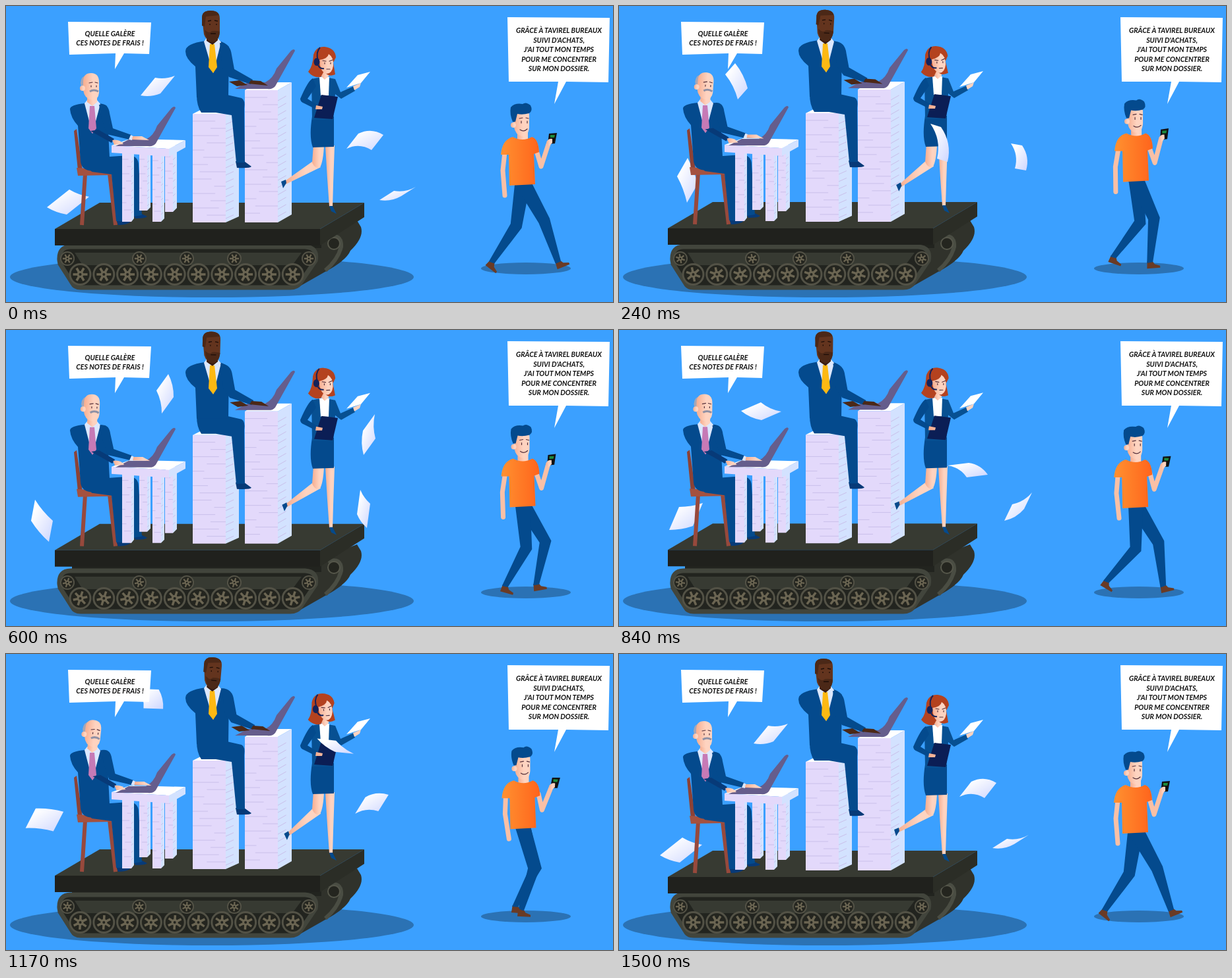
An HTML page for the animation above (1.53 s loop, 920 by 450 pixels).

```html
<!DOCTYPE html>
<html lang="fr">
<head>
<meta charset="utf-8">
<style>
html, body { margin: 0; width: 100%; height: 100%; overflow: hidden; background: #3ba0ff }
svg { display: block; width: 920px; height: 450px }
text { font: italic 700 10.6px Lato, sans-serif; text-anchor: middle; fill: #111 }
.navy { fill: #044a8d }
.dark { fill: #073a78 }
.skin { fill: url(#skin) }
.brown { fill: #4b2817 }
.page { fill: #e3d9fb }
.edge { fill: #d3e2ff }
.white { fill: #fff }
.shirt { fill: #dce8ff }
.laptop { fill: #655d8c }
.line { fill: none; stroke: #c9bfea }
.face { fill: none; stroke: #54303a; stroke-width: 1.2; stroke-linecap: round }
.limb { fill: none; stroke: #f9c0a6; stroke-width: 7; stroke-linecap: round; stroke-linejoin: round }
.chair { fill: none; stroke: #97493c; stroke-width: 6 }
.sheet { fill: url(#sheet) }
</style>
</head>
<body>
<svg viewBox="0 0 920 450">
<defs>
  <linearGradient id="skin"><stop stop-color="#f6ad8f"/><stop offset=".6" stop-color="#fed3c0"/></linearGradient>
  <linearGradient id="shirt"><stop stop-color="#ff9130"/><stop offset="1" stop-color="#ff641c"/></linearGradient>
  <linearGradient id="sheet" x2="1" y2="1"><stop offset=".2" stop-color="#fff"/><stop offset="1" stop-color="#cdd6ff"/></linearGradient>
  <path id="laptop" class="laptop" d="M166 213 186 203H212Q224 197 229 182L251 155Q256 151 257 155L227 209Q223 214 215 213Z"/>
</defs>
<g fill="#2b72b4"><ellipse cx="312" cy="412" rx="306" ry="31"/><ellipse cx="788" cy="399" rx="68" ry="9"/></g>

<!-- tracks -->
<path fill="#30322b" d="M440 429 482 405Q516 387 522 372 543 352 538 336L532 326 470 350Z"/>
<path fill="none" stroke="#4a4d43" stroke-width="6" d="M488 352Q509 345 508 366 503 386 484 402"/>
<circle cx="497" cy="361" r="9" fill="#24251f" stroke="#56574b" stroke-width="2"/>
<path fill="#22241f" d="M100 354H478V368H100Z"/>
<path fill="#22241f" stroke="#42453c" stroke-width="7" d="M81 386Q80 366 98 366H453Q473 367 469 387L446 421Q441 428 431 428H113Q104 428 101 422L82 392Z"/>
<path fill="#373a32" d="M104 375H448L434 394H116Z"/>
<g id="wheels"></g>

<g class="deck">
  <path fill="#373a32" d="M74 339 142 299H543L476 339Z"/>
  <path fill="#20211d" d="M74 339H476V364H74Z"/>
  <path fill="#2b2d26" d="M476 339 543 299V321L476 364Z"/>
</g>
<path class="sheet"/>

<g class="deck">
  <!-- seated clerk -->
  <path fill="#8c4236" d="M103 190 107 187 116 250H109Z"/>
  <path class="chair" d="M120 255 115 333M157 255 166 333"/>
  <path fill="#a4513f" d="M107 246 160 249V257L109 258Z"/>
  <path class="dark" d="M192 316H206L214 320Q212 323 196 323ZM167 325H189Q190 332 170 333Z"/>
  <path class="navy" d="M116 232 186 227Q201 228 201 242L206 318 194 320 188 327H167L160 256 130 252Z"/>
  <path class="navy" d="M120 148Q97 150 97 157 98 170 109 182L113 236Q114 250 132 251L158 250 153 152Q148 148 138 148Z"/>
  <path class="shirt" d="M119 148 123 143H138L143 149 131 194Z"/>
  <path fill="#c67ab6" d="M127 152H134L137 186 131 194 125 186Z"/>
  <g class="tilt" data-pivot="128 148" data-angle="6">
    <path class="skin" d="M123 132H138V146L131 152 123 146Z"/>
    <path fill="#a5a6b7" d="M113 117Q114 106 122 106V126H115Z"/>
    <path class="skin" d="M117 115Q117 102 129 102 141 102 141 116V132Q140 143 130 143 119 141 117 128Z"/>
    <circle class="skin" cx="116" cy="125" r="4"/>
    <path class="face" d="M129 121V123M137 121V123M126 117 131 116M135 116 139 117"/>
    <path d="M127 130Q133 126 140 130" fill="none" stroke="#8f91a5" stroke-width="3"/>
  </g>
  <g id="desk"></g>
  <path class="white" d="M160 212 188 202 272 204 247 217Z"/>
  <path class="page" d="M160 212 247 217V229L160 223Z"/>
  <path class="edge" d="M247 217 272 204V215L247 229Z"/>
  <use href="#laptop"/>
  <g class="typing">
    <path class="dark" d="M128 190 140 188 164 202 160 208Z"/>
    <path class="skin" d="M161 204Q172 202 178 210L164 211Z"/>
    <path class="navy" d="M141 150Q155 147 157 163L162 186 190 196 187 203 153 195 145 172Z"/>
    <path class="shirt" d="M189 196 193 198 191 204 186 203Z"/>
    <path class="skin" d="M192 198H206L217 204 191 203Z"/>
  </g>

  <g id="stacks"></g>

  <!-- man on the stack -->
  <path class="dark" d="M348 236H361L372 244Q370 247 350 246Z"/>
  <path class="navy" d="M289 135H335L357 140Q363 143 361 156L362 238H349L342 166 318 162H296Q289 152 289 135Z"/>
  <path class="navy" d="M302 53Q272 57 272 69 272 80 287 92L289 139H337L338 62Q332 55 322 53Z"/>
  <path class="shirt" d="M300 54 304 49H321L326 55 314 102Z"/>
  <path fill="#fdb913" d="M309 58H316L320 93 314 102 307 93Z"/>
  <use href="#laptop" x="181" y="-87"/>
  <g class="typing">
    <path class="brown" d="M338 115 354 113 366 120 350 122Z"/>
    <path class="navy" d="M324 56Q340 57 342 74L346 96 374 112 371 119 338 108 328 94Z"/>
    <path class="brown" d="M371 113 386 114 397 121 368 118Z"/>
  </g>
  <g class="tilt" data-pivot="312 55" data-angle="5">
    <path fill="#3a1d11" d="M304 38H321V52L313 59 304 53Z"/>
    <path fill="#63341e" d="M297 18Q297 7 310 7 324 7 324 19V39Q323 53 313 54 303 53 300 43Z"/>
    <path class="brown" d="M297 18Q297 7 310 7 321 7 323 14L303 16 301 31 297 30ZM301 36Q308 43 312 38 319 37 324 39 323 54 313 55 303 54 301 36Z"/>
    <path d="M309 27V29M319 27V29M306 23 311 22M316 22 321 23M310 42H318" fill="none" stroke="#1d0d08" stroke-width="1.3"/>
  </g>

  <!-- assistant -->
  <g id="calf">
    <path class="skin" d="M465 236 477 245 424 271 420 268Z"/>
    <path class="navy" d="M424 264 425 269 420 277 417 267Z"/>
  </g>
  <path class="skin" d="M466 211H482Q481 236 476 245 469 249 464 238Z"/>
  <path class="skin" d="M484 212H498L496 270 495 305H490L487 262Z"/>
  <path class="navy" d="M490 304H495L501 316 493 312ZM464 168H497V214L465 215Q459 199 464 168Z"/>
  <path fill="#075092" d="M463 111Q480 106 499 111L507 131 527 122 529 129 508 141 499 134 496 173H464Z"/>
  <path class="white" d="M475 108H490L489 136H477Z"/>
  <path class="skin" d="M478 100H489V107L483 112 478 107Z"/>
  <path fill="#0b1e55" d="M478 135 503 138 495 172 467 170Z"/>
  <path class="navy" d="M465 110Q458 113 446 141 446 146 452 148L470 157 473 151 457 141 470 122Z"/>
  <path class="skin" d="M470 151 480 153 479 157 469 157ZM526 122 538 117 536 123 528 128Z"/>
  <path class="white" d="M516 124 533 105 552 100 538 117Z"/>
  <g class="tilt" data-pivot="482 105" data-angle="-5">
    <path fill="#b4421f" d="M466 74Q470 61 483 62 499 64 500 78L496 86 499 104Q488 109 482 99L477 108Q466 110 458 100 465 92 466 74Z"/>
    <path class="skin" d="M475 82Q488 80 489 73 497 78 496 91 494 103 486 103 476 101 475 82Z"/>
    <path class="face" d="M483 86V88M492 86V88M480 83 485 84M490 84 495 82M486 96H491"/>
    <path d="M473 84Q469 70 476 63M473 90Q476 96 482 95" fill="none" stroke="#14225a" stroke-width="2"/>
    <ellipse cx="471" cy="85" rx="4.5" ry="6" fill="#14225a"/>
  </g>
</g>
<path class="sheet"/><path class="sheet"/><path class="sheet"/>

<!-- walker -->
<g id="legs"></g>
<g id="walker">
  <path class="limb" id="arm"/>
  <g id="phone">
    <path class="limb" d="M804 220 811 244 822 210"/>
    <path fill="#111" d="M823 194 835 193 832 209 821 210Z"/>
    <path fill="#1d8a3c" d="M825 196H832L831 200H825Z"/>
    <path class="skin" d="M819 207Q822 201 828 202V208L822 214Z"/>
  </g>
  <path class="skin" d="M775 186H791V202L783 207 775 202Z"/>
  <path fill="url(#shirt)" d="M768 199Q783 207 797 199 807 202 808 222L800 225 802 271 763 273 762 226 750 226Q752 203 768 199Z"/>
  <path class="skin" d="M769 165Q769 158 781 158 793 158 793 166V184Q792 198 782 198 772 196 770 184Z"/>
  <circle class="skin" cx="769" cy="181" r="4"/>
  <path class="navy" d="M768 176Q763 164 765 154 771 147 783 149 788 145 795 151 799 159 793 163 783 166 775 164L772 176Z"/>
  <path class="face" d="M781 175V178M790 175V178M778 171 783 170M788 170 792 171M779 188Q785 192 790 187"/>
</g>

<path class="white" d="M94 24 220 25 217 73 179 72 165 96 166 72 96 74Z"/>
<path class="white" d="M760 17 915 18 913 116 849 115 831 149 837 115 762 115Z"/>
<g id="speech"></g>
</svg>

<script>
const LOOP = 1530, CYCLE = 1500, STEP = 30;
const $ = id => document.getElementById(id);
const all = selector => [...document.querySelectorAll(selector)];
const set = (el, transform) => el.setAttribute('transform', transform);

// Each pose of a flying sheet: three corners (x, y) and the bend of two edges.
const keys = [0, .12, .32, .58, .8];
const left = [
  [62,306, 96,279, 126,290, 2], [76,304, 91,269, 127,263, 2], [88,259, 104,231, 119,271, -2],
  [27,266, 42,236, 85,240, -2], [38,290, 44,258, 71,290, 2]];
const middle = [
  [516,217, 534,194, 572,196, -7], [498,206, 530,202, 559,220, -5], [472,179, 488,184, 498,237, -8],
  [474,127, 503,129, 530,148, 3], [541,153, 559,128, 560,165, 3]];
const right = [
  [566,295, 588,281, 621,275, 4], [584,290, 596,265, 626,247, 4], [594,209, 611,212, 617,250, -6],
  [526,246, 541,219, 577,214, -5], [532,280, 537,243, 552,264, 2]];
const high = [
  [204,136, 226,109, 256,106, 3], [185,123, 215,110, 246,124, 3], [161,104, 176,87, 195,125, -3],
  [205,52, 235,53, 241,82, -3], [228,92, 246,67, 254,102, -3]];
const sheets = [left, middle, right, high];

// Closed smooth curve through the poses.
function poseAt(poses, p) {
  const n = keys.length, i = keys.filter(k => k <= p).length - 1;
  const time = k => keys[(k + n) % n] + Math.floor(k / n);
  const at = k => poses[(k + n) % n];
  const start = time(i), span = time(i + 1) - start, u = (p - start) / span;
  return at(i).map((a, j) => {
    const b = at(i + 1)[j];
    const m = (b - at(i - 1)[j]) / (time(i + 1) - time(i - 1)) * span;
    const k = (at(i + 2)[j] - a) / (time(i + 2) - start) * span;
    return ((2*u - 3)*u*u + 1)*a + ((u - 2)*u + 1)*u*m + (3 - 2*u)*u*u*b + (u - 1)*u*u*k;
  });
}

function sheetPath([ax, ay, bx, by, cx, cy, bend]) {
  const dx = ax + cx - bx, dy = ay + cy - by, len = Math.hypot(cx - bx, cy - by) || 1;
  const nx = (by - cy) / len * bend * 1.5, ny = (cx - bx) / len * bend * 1.5;
  return `M${ax} ${ay}L${bx} ${by}Q${(bx + cx)/2 + nx} ${(by + cy)/2 + ny} ${cx} ${cy}` +
    `L${dx} ${dy}Q${(ax + dx)/2 + nx} ${(ay + dy)/2 + ny} ${ax} ${ay}Z`;
}

// Tapered leg with the knee bent forward, and a shoe.
function leg(hipX, hipY, x, y, tilt) {
  const bone = 67, dx = x - hipX, dy = y - hipY, d = Math.hypot(dx, dy);
  const bend = Math.sqrt(Math.max(0, bone*bone - d*d/4)) / d;
  const kx = hipX + dx/2 + dy*bend, ky = hipY + dy/2 - dx*bend;
  const nx = dy/d, ny = -dx/d;
  const side = s => [[hipX, hipY, 12], [kx, ky, 9], [x, y, 4.5]].map(([px, py, w]) => [px + s*w*nx, py + s*w*ny]);
  return `<path fill="#6a3b25" transform="translate(${x} ${y}) rotate(${tilt})" d="M-4-2H4L7 3 15 6V9H-5Z"/>` +
    `<path class="navy" d="M${side(1).concat(side(-1).reverse()).join('L')}Z"/>`;
}

function foot(q) {
  if (q < 1) return [837 - 101*q, 390, -22*(1 - q)**4 + 38*q**4];
  const s = q - 1;
  return [736 + 101*s**1.8, 390 - 8*Math.sin(Math.PI*Math.sqrt(s)), 38 - 60*s];
}

const wheel = (x, y, size) => `<g transform="translate(${x} ${y}) scale(${size})">
  <circle r="15.5" fill="#24251f" stroke="#535246" stroke-width="3"/>
  <path class="spokes" stroke="#6b6552" stroke-width="3.5" d="M-11 0H11M-5.5-9.5 5.5 9.5M5.5-9.5-5.5 9.5"/>
  <circle r="5" fill="#6b6552"/><circle r="2" fill="#24251f"/></g>`;
$('wheels').innerHTML = [93, 202, 274, 346, 459].map(x => wheel(x, 384, .65)).join('') +
  Array.from({length: 10}, (_, i) => wheel(112.5 + 35.8*i, 408, 1)).join('');

// Pile of paper: front, side and top faces with a few loose edges.
function pile(x, y, w, h, depth, rise) {
  let lines = '';
  for (let i = 1; i * 11 < h - 8; i++) {
    const len = w * (.35 + i * 3 % 5 / 9), ly = y + 11*i;
    lines += `M${i % 2 ? x : x + w - len} ${ly}h${len}M${x + w} ${ly + 5}l${depth * .6} ${-rise * .6}`;
  }
  return `<path class="white" d="M${x} ${y}l${depth*.9} ${-rise}h${w}l${depth*.1} 0L${x + w} ${y}Z"/>
    <path class="page" d="M${x} ${y}h${w}v${h}h${-w}Z"/>
    <path class="edge" d="M${x + w} ${y}l${depth} ${-rise}v${h}l${-depth} ${rise}Z"/><path class="line" d="${lines}"/>`;
}
$('desk').innerHTML = pile(202, 222, 12, 89, 5, 5) + pile(241, 218, 12, 95, 6, 6) +
  pile(176, 222, 14, 106, 4, 5) + pile(222, 224, 13, 104, 5, 5);
$('stacks').innerHTML = pile(283, 164, 50, 165, 20, 9) + pile(362, 128, 50, 201, 21, 12);

const say = (x, y, lines) => lines.map((line, i) => `<text x="${x}" y="${y + 14.6*i}">${line}</text>`).join('');
$('speech').innerHTML = say(157.5, 45.5, ['QUELLE GALÈRE', 'CES NOTES DE FRAIS !']) +
  say(838, 41, ['GRÂCE À TAVIREL BUREAUX', "SUIVI D'ACHATS,", "J'AI TOUT MON TEMPS", 'POUR ME CONCENTRER', 'SUR MON DOSSIER.']);

const decks = all('.deck'), tilts = all('.tilt'), hands = all('.typing'), spokes = all('.spokes'), papers = all('.sheet');
// The high sheet passes behind the left bubble.
$('legs').before(papers[3]);

function draw(ms) {
  const turn = ms / CYCLE % 1, p = turn * 2 % 1;
  const sway = Math.sin(Math.PI * p) ** 2, swing = Math.sin(2 * Math.PI * turn);
  const lift = 7 * Math.sin(Math.PI * p) ** 1.3;

  decks.forEach(el => set(el, `translate(0 ${-2.4 * (1 - Math.cos(2 * Math.PI * turn))})`));
  tilts.forEach(el => set(el, `rotate(${el.dataset.angle * sway} ${el.dataset.pivot})`));
  hands.forEach(el => set(el, `translate(${3.5 * sway} ${-2 * sway})`));
  spokes.forEach(el => set(el, `rotate(${120 * turn})`));
  set($('calf'), `rotate(${-9 * sway} 474 242)`);
  papers.forEach((el, i) => el.setAttribute('d', sheetPath(poseAt(sheets[i], p))));

  $('legs').innerHTML = [turn * 2 + 1, turn * 2].map(q => leg(783, 268 - lift, ...foot(q % 2))).join('');
  set($('walker'), `translate(${1.5 * sway} ${-lift})`);
  set($('phone'), `rotate(${-4 * swing} 811 244)`);
  $('arm').setAttribute('d', `M756 222 ${753 - 2*swing} 250 ${756 - 5*swing} 288`);
}

function tick() {
  draw(Math.floor(performance.now() % LOOP / STEP) * STEP);
  requestAnimationFrame(tick);
}
tick();
</script>
</body>
</html>
```
